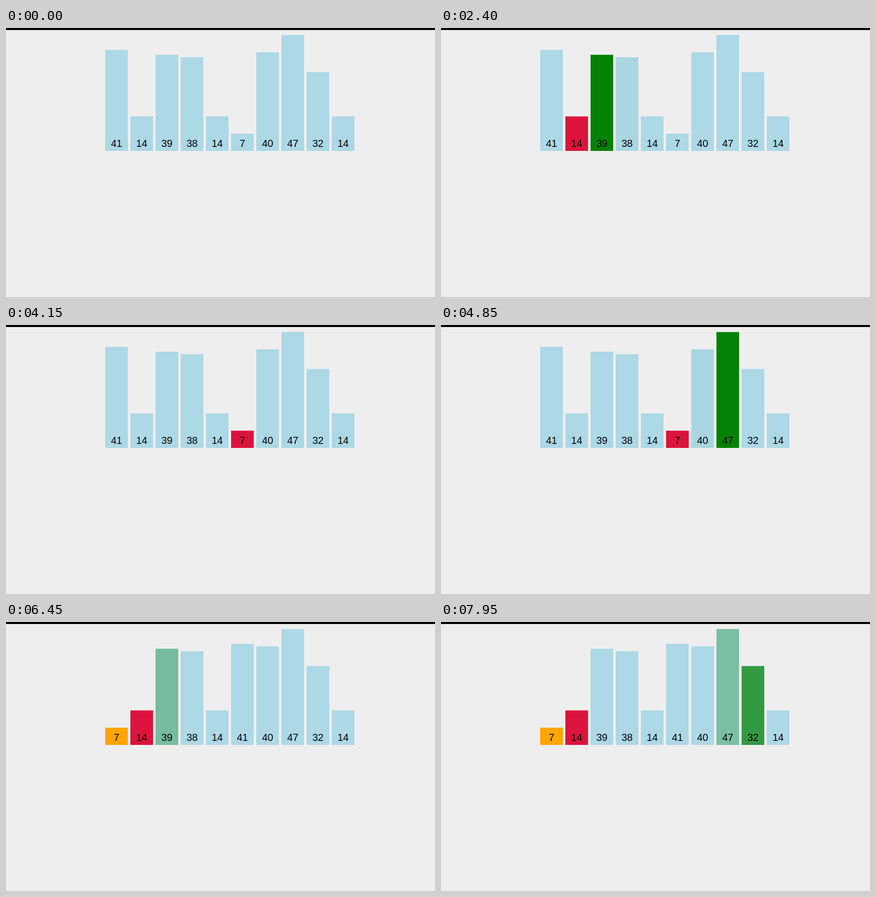
Animation, 852 px wide and 534 px high, one loop 8000 ms. Source, as an HTML page:

```html
<!DOCTYPE html>
<html lang="en">
<head>
<meta charset="utf-8">
<title>Selection sort</title>
<style>
  html, body { margin: 0; width: 100%; height: 100%; overflow: hidden; background: #eee; }
  svg { display: block; }
  text { font: 20px "Liberation Sans", Arial, sans-serif; text-anchor: middle; }
</style>
</head>
<body>
<svg id="stage" width="852" height="534" viewBox="0 0 852 534">
  <rect width="852" height="4"/>
</svg>
<script>
const LOOP = 8000, TICK = 1000 / 12, FADE = 250;
const LEFT = 197, PITCH = 50, WIDTH = 45, BASE = 244, UNIT = 230 / 47;
const values = [41, 14, 39, 38, 14, 7, 40, 47, 32, 14];

const idle = [173, 216, 230], check = [0, 128, 0], minimum = [220, 20, 60], sorted = [255, 165, 0];
const pass = (from, to) => ({ [from]: idle, [to]: check });

// Each step: start time, new colours by bar, new slots by bar
const steps = [
  [405, { 0: minimum }],
  [895, { 1: check }],
  [1372, { 0: idle, 1: minimum }],
  [1880, { 2: check }],
  [2372, pass(2, 3)],
  [2862, pass(3, 4)],
  [3352, pass(4, 5)],
  [3842, { 1: idle, 5: minimum }],
  [4400, { 6: check }],
  [4628, pass(6, 7)],
  [4868, pass(7, 8)],
  [5108, pass(8, 9)],
  [5349, { 9: idle, 0: minimum }],
  [5589, {}, { 0: 5, 5: 0 }],
  [5829, { 0: idle, 5: sorted }],
  [6069, { 1: minimum }],
  [6309, { 2: check }],
  [6549, pass(2, 3)],
  [6862, pass(3, 4)],
  [7102, pass(4, 0)],
  [7325, pass(0, 6)],
  [7548, pass(6, 7)],
  [7771, pass(7, 8)]
];

const stage = document.getElementById("stage");
const add = (parent, tag, attrs) => {
  const node = document.createElementNS("http://www.w3.org/2000/svg", tag);
  for (const key in attrs) node.setAttribute(key, attrs[key]);
  return parent.appendChild(node);
};

const bars = values.map(value => {
  const group = add(stage, "g");
  const height = value * UNIT;
  const rect = add(group, "rect", { y: BASE - height, width: WIDTH, height });
  add(group, "text", { x: WIDTH / 2, y: 236 }).textContent = value;
  return { group, rect };
});

const mix = (a, b, p) => a + (b - a) * p;
const ease = p => p < 0.5 ? 4 * p ** 3 : 1 - 4 * (1 - p) ** 3;

function draw(time) {
  const colours = values.map(() => idle);
  const slots = values.map((_, i) => i);
  for (const [start, fills, moves = {}] of steps) {
    if (time <= start) break;
    const p = ease(Math.min(1, (time - start) / FADE));
    for (const i in fills) colours[i] = colours[i].map((c, k) => mix(c, fills[i][k], p));
    for (const i in moves) slots[i] = mix(slots[i], moves[i], p);
  }
  bars.forEach(({ group, rect }, i) => {
    group.setAttribute("transform", `translate(${LEFT + PITCH * slots[i]} 0)`);
    rect.setAttribute("fill", `rgb(${colours[i].map(Math.round)})`);
  });
}

let origin;
function frame(now) {
  origin ??= now;
  const time = (now - origin) % LOOP;
  draw(Math.floor((time + 17) / TICK) * TICK);
  requestAnimationFrame(frame);
}
draw(0);
requestAnimationFrame(frame);
</script>
</body>
</html>
```
